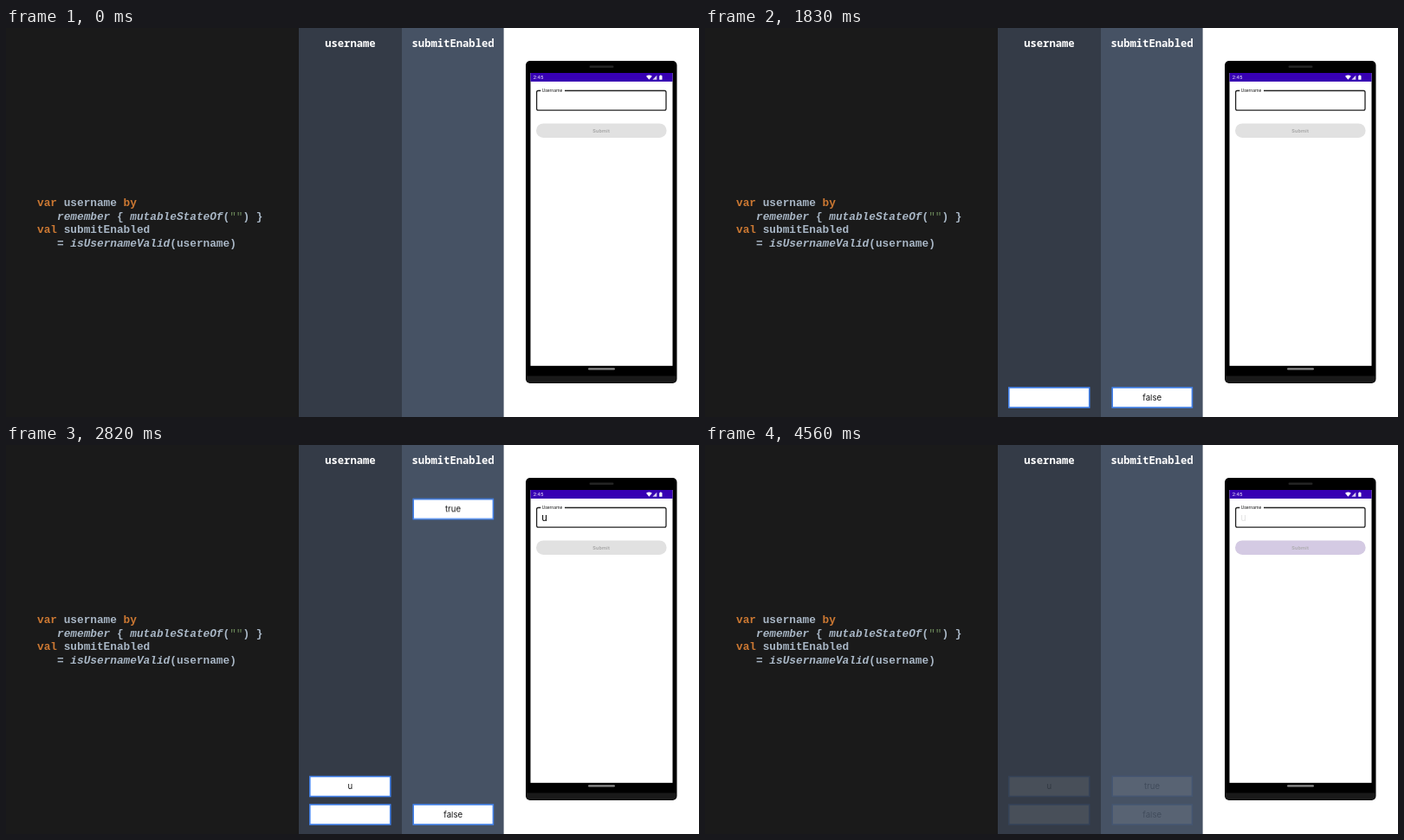
These frames come from a looping animation (800x450 px, 4.62 s). An HTML page:

```html
<!DOCTYPE html>
<html lang="en">
<head>
<meta charset="utf-8">
<title>State flow</title>
<style>
  html, body { margin: 0; width: 100%; height: 100%; overflow: hidden; background: #fff; }
  svg { display: block; width: 100%; height: 100%; }

  .code { font: bold 12.78px "Liberation Mono", "Courier New", monospace; fill: #a9b7c6; white-space: pre; }
  .key { fill: #cc7832; }
  .str { fill: #6a8759; font-weight: normal; }
  .call { font-style: italic; }
  .head { font: bold 12.2px "Noto Sans Mono", "DejaVu Sans Mono", monospace; fill: #fff; text-anchor: middle; }
  .ui { font-family: Roboto, sans-serif; }

  .box rect { fill: #fff; stroke: #4382ec; stroke-width: 1.6; }
  .box text { font: 9.6px Inter, sans-serif; fill: #111; text-anchor: middle; }
  .button text { font-size: 5.8px; font-weight: 500; letter-spacing: .2px; text-anchor: middle; }

  .box, .fade, .cursor, .typed, .enabled { animation: 4620ms linear 36ms infinite backwards; }
  .fade { animation-name: fade; }
  .cursor { animation-name: cursor; }
  .typed { animation-name: typed; }
  .enabled { animation-name: enabled; }
  .box { --drop: cubic-bezier(.326, .512, .638, 1); }
  .low { --from: -440px; }
  .high { --from: -408px; }
  .name1 { animation-name: name1; }
  .flag1 { animation-name: flag1; }
  .name2 { animation-name: name2; }
  .flag2 { animation-name: flag2; }

  @keyframes name1 {
    0% { transform: translateY(var(--from)); }
    10.281% { transform: translateY(var(--from)); animation-timing-function: var(--drop); }
    19.805%, 100% { transform: none; }
  }
  @keyframes flag1 {
    0% { transform: translateY(var(--from)); }
    20.043% { transform: translateY(var(--from)); animation-timing-function: var(--drop); }
    29.567%, 100% { transform: none; }
  }
  @keyframes name2 {
    0% { transform: translateY(var(--from)); }
    49.156% { transform: translateY(var(--from)); animation-timing-function: var(--drop); }
    58.68%, 100% { transform: none; }
  }
  @keyframes flag2 {
    0% { transform: translateY(var(--from)); }
    58.723% { transform: translateY(var(--from)); animation-timing-function: var(--drop); }
    68.247%, 100% { transform: none; }
  }
  @keyframes cursor {
    0%, 39.286% { opacity: 0; }
    42.208%, 44.481% { opacity: 1; }
    48.052%, 100% { opacity: 0; }
  }
  @keyframes typed {
    0%, 44.481% { opacity: 0; }
    48.052%, 100% { opacity: 1; }
  }
  @keyframes enabled {
    0%, 70.455% { opacity: 0; }
    79.87%, 100% { opacity: 1; }
  }
  @keyframes fade {
    0%, 89.827% { opacity: 1; }
    98.874%, 100% { opacity: 0; }
  }
</style>
</head>
<body>
<svg viewBox="0 0 800 450">
  <rect width="800" height="450" fill="#fff"/>
  <rect width="574.6" height="450" fill="#465264"/>
  <rect width="457" height="450" fill="#343b47"/>
  <rect width="338" height="450" fill="#1a1a1a"/>

  <g class="code">
    <text x="36" y="206.3" xml:space="preserve"><tspan class="key">var</tspan> username <tspan class="key">by</tspan></text>
    <text x="59" y="221.8" xml:space="preserve"><tspan class="call">remember</tspan> { <tspan class="call">mutableStateOf</tspan>(<tspan class="str">""</tspan>) }</text>
    <text x="36" y="237.3" xml:space="preserve"><tspan class="key">val</tspan> submitEnabled</text>
    <text x="59" y="252.8" xml:space="preserve">= <tspan class="call">isUsernameValid</tspan>(username)</text>
  </g>

  <g class="fade">
    <g class="box low name1">
      <rect x="350.8" y="416" width="92.9" height="23"/>
    </g>
    <g class="box low flag1">
      <rect x="470.2" y="416" width="92.2" height="23"/>
      <text x="516.2" y="430.8">false</text>
    </g>
    <g class="box high name2">
      <rect x="350.8" y="383.5" width="92.9" height="23"/>
      <text x="397.3" y="398.3">u</text>
    </g>
    <g class="box high flag2">
      <rect x="470.2" y="383.3" width="92.2" height="23"/>
      <text x="516" y="398.3">true</text>
    </g>
  </g>

  <g class="head">
    <text x="397.4" y="21.5">username</text>
    <text x="516.1" y="21.5">submitEnabled</text>
  </g>

  <g class="ui">
    <rect x="600" y="38" width="174.5" height="373" rx="5" fill="#000"/>
    <path d="M600.8 402.5H773.7V406Q773.7 410.3 769.5 410.3H605Q600.8 410.3 600.8 406Z" fill="#191919"/>
    <rect x="673.5" y="43.4" width="28" height="2.6" rx="1.3" fill="#242424"/>
    <rect x="672" y="393.3" width="31" height="2.2" rx="1.1" fill="#8c8c8c"/>
    <rect x="605.5" y="52" width="164" height="338.8" fill="#fff"/>
    <rect x="605.5" y="52" width="164" height="10" fill="#3700b3"/>
    <text x="608.8" y="59.4" font-size="6" fill="#e9e2f7">2:45</text>
    <g fill="#fff">
      <path d="M739 55.7Q742.4 53.2 745.8 55.7L742.4 59.7Z"/>
      <path d="M746.4 59.7L751.3 54.8V59.7Z" opacity=".8"/>
      <path d="M754.2 55.2H755.1V54.5H756.6V55.2H757.5V59.8H754.2Z"/>
    </g>

    <path d="M617.3 72.5H614.5Q612.6 72.5 612.6 74.4V93.2Q612.6 95.1 614.5 95.1H760.1Q762 95.1 762 93.2V74.4Q762 72.5 760.1 72.5H645" fill="none" stroke="#222" stroke-width="1.3"/>
    <text x="618.8" y="74.2" font-size="5.2" fill="#222">Username</text>
    <g class="button">
      <rect x="612" y="110.4" width="150.6" height="16.6" rx="8.3" fill="#e1e1e1"/>
      <text x="687.2" y="120.8" fill="#a0a0a0">Submit</text>
    </g>

    <g class="fade">
      <rect class="cursor" x="618" y="76.8" width=".8" height="16.4" fill="#222"/>
      <text class="typed" x="618.2" y="88.2" font-size="12" fill="#111">u</text>
      <g class="button enabled">
        <rect x="612" y="110.4" width="150.6" height="16.6" rx="8.3" fill="#6200ee"/>
        <text x="687.2" y="120.8" fill="#fff">Submit</text>
      </g>
    </g>
  </g>
</svg>
</body>
</html>
```
